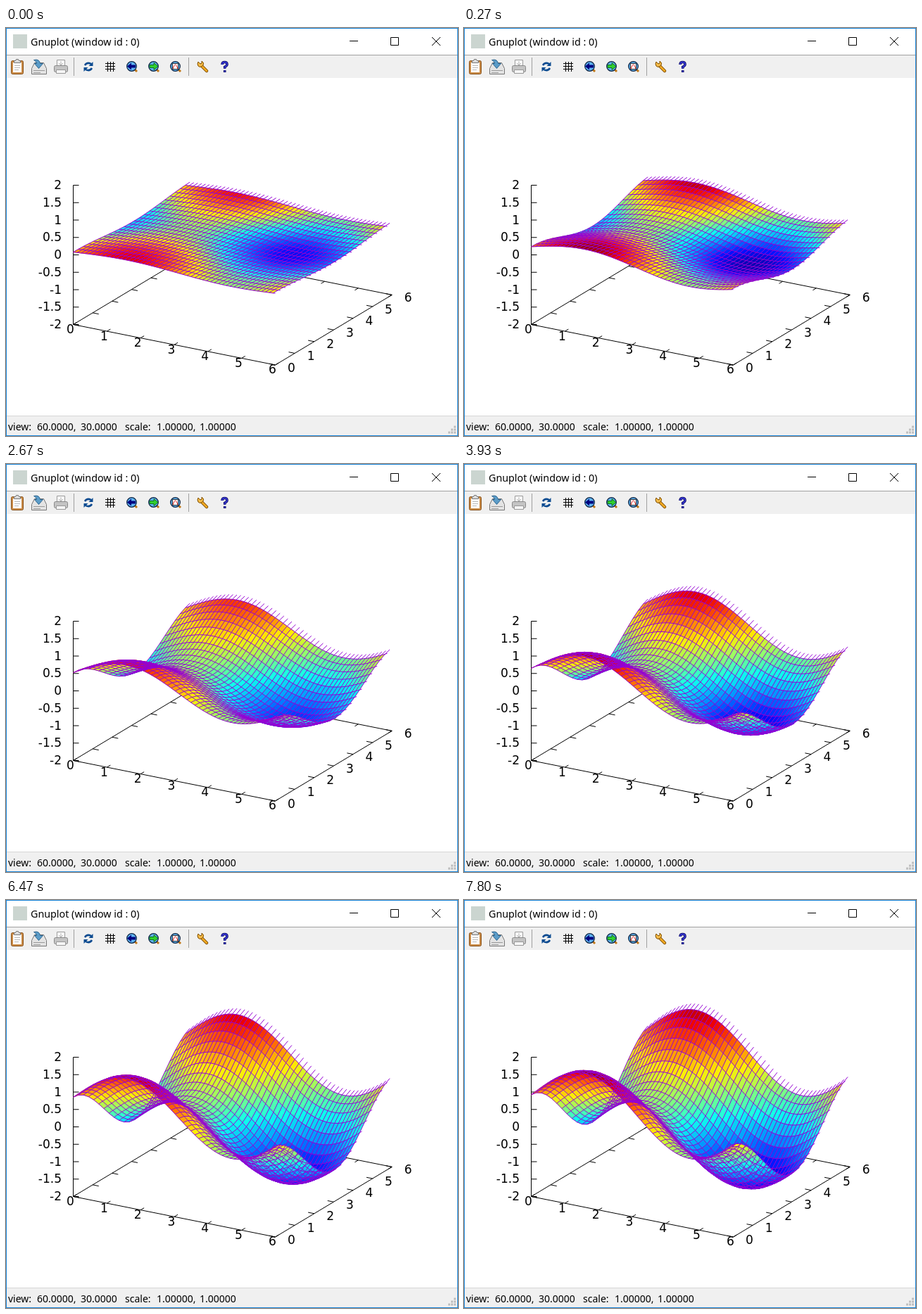
These frames come from a looping animation (642x580 px, 8 s). An HTML page with a canvas:

```html
<!DOCTYPE html>
<html lang="en">
<head>
<meta charset="utf-8">
<title>Surface plot</title>
<style>
html, body { margin: 0; width: 100%; height: 100%; overflow: hidden; background: #fff; }
svg, canvas { position: absolute; left: 0; top: 0; display: block; }
.ui { font-family: "Segoe UI", "Open Sans", sans-serif; }
.num { font: 17px Verdana, "DejaVu Sans", sans-serif; }
</style>
</head>
<body>
<svg width="642" height="580" viewBox="0 0 642 580">
  <rect width="642" height="580" fill="#fff"/>
  <rect y="39" width="642" height="32" fill="#f0f0f0"/>
  <path d="M0 38.5H642" stroke="#a0a0a0"/>
  <rect y="551" width="642" height="29" fill="#f0f0f0"/>
  <path d="M0 551.5H642" stroke="#d7d7d7"/>

  <rect x="10" y="9" width="20" height="20" fill="#cbd5d0"/>
  <text class="ui" x="35" y="25" font-size="14.3">Gnuplot (window id : 0)</text>
  <path d="M488 18.5H500M546.5 13.5h11v11h-11zM605 13l12 12M617 13l-12 12" fill="none" stroke="#000"/>
  <path d="M96.5 42V68M259.5 42V68" stroke="#a0a0a0"/>

  <!-- clipboard -->
  <rect x="7.5" y="46.5" width="17" height="19" rx="2" fill="#c98a45" stroke="#8a5520"/>
  <path d="M10 49h12v14h-12z" fill="#fff"/>
  <path d="M12 53.5h8M12 56.5h8M12 59.5h6" stroke="#b5b5b5"/>
  <path d="M11.5 49.5v-3h2l1-2h3l1 2h2v3z" fill="#ddd" stroke="#777"/>
  <!-- save -->
  <path d="M36.5 57.5l4-8h13l4 8v8h-21z" fill="#e4e4e4" stroke="#777"/>
  <path d="M39 60.5h16M39 63.5h10" stroke="#999"/>
  <path d="M39.5 45.5q8-2 9 5h4l-6 7-6-7h3q0-3-4-5z" fill="#5b9cc8" stroke="#2c6590"/>
  <!-- printer -->
  <path d="M72.5 54v-8.5h11V54" fill="#fff" stroke="#999"/>
  <rect x="68.5" y="53.5" width="19" height="9" rx="2" fill="#c4c4c4" stroke="#888"/>
  <path d="M71.5 59.5h13v5h-13z" fill="#f5f5f5" stroke="#999"/>
  <path d="M78 47v5m-3-2l3 3 3-3" fill="none" stroke="#aaa"/>
  <!-- refresh -->
  <path d="M112 53q3-5 9-2M122 57q-3 5-9 2" fill="none" stroke="#0b4a90" stroke-width="2.5"/>
  <path d="M123.5 48v6h-6zM110.5 62v-6h6z" fill="#0b4a90"/>
  <!-- grid -->
  <path d="M144.5 48v14M148.5 48v14M152.5 48v14M141 50.5h14M141 54.5h14M141 58.5h14" stroke="#000"/>
  <!-- zooms -->
  <g id="lens">
    <path d="M182 58l4 4" stroke="#c17818" stroke-width="3"/>
    <circle cx="178.5" cy="54.5" r="6.8" fill="#5fb4f2" stroke="#102848" stroke-width="1.3"/>
  </g>
  <use href="#lens" x="31"/>
  <use href="#lens" x="62"/>
  <path d="M172 54.5l6-5v3h6v4h-6v3z" fill="#000080"/>
  <path d="M216 54.5l-6-5v3h-6v4h6v3z" fill="#30d030" stroke="#086008" stroke-width=".8"/>
  <path d="M236.5 50.5h8v8h-8z" fill="#fff" stroke="#333"/>
  <path d="M237 58q3.500-12 7 0" fill="none" stroke="#e02020"/>
  <!-- wrench -->
  <path d="M277 53l8 8" stroke="#7c4b00" stroke-width="4.5" stroke-linecap="round"/>
  <path d="M277 53l8 8" stroke="#f2aa22" stroke-width="2.5" stroke-linecap="round"/>
  <path d="M273 48l3 3 2-1 0-3q4 2 2 6-4 4-7 1-2-3 0-6z" fill="#f5bc48" stroke="#7c4b00"/>
  <!-- help -->
  <path d="M307 52q0-3.500 3.500-3.500t3.500 3.200q0 2-3.300 3.600v2.500M310.700 60v3" fill="none" stroke="#101060" stroke-width="3.6"/>
  <path d="M307 52q0-3.500 3.500-3.500t3.500 3.200q0 2-3.300 3.600v2.500M310.700 60.500v2" fill="none" stroke="#3434d0" stroke-width="1.8"/>

  <g class="ui" font-size="14">
    <text x="3" y="572">view:</text>
    <text x="44" y="572">60.0000,</text>
    <text x="106" y="572">30.0000</text>
    <text x="169" y="572">scale:</text>
    <text x="214" y="572">1.00000,</text>
    <text x="275" y="572">1.00000</text>
  </g>
  <path d="M636 567h3M636 571h3M636 575h3M632 571h3M632 575h3M628 575h3" stroke="#bfbfbf" stroke-width="3"/>
  <path id="axes" fill="none" stroke="#000"/>
  <g id="labels" class="num"></g>
  <rect x=".5" y=".5" width="641" height="579" fill="none" stroke="#1883d7"/>
</svg>
<canvas id="plot" width="642" height="580"></canvas>
<script>
const SIZE = 6, ZPX = 49.5;
const STEP_X = Math.PI / 27, STEP_Y = Math.PI / 12;
const CHANGES = [270, 1470, 2670, 3930, 5200, 6470, 7800], LOOP = 8000;
const PALETTE = [[0, 0, 144], [0, 15, 255], [0, 144, 255], [15, 255, 238], [144, 255, 112],
  [255, 238, 0], [255, 112, 0], [238, 0, 0], [127, 0, 0]];

// View turned by 30 degrees and tilted by 60
const project = (x, y, z) => [
  95.5 + (287 * x + 165.7 * y) / SIZE,
  322.5 + (57.5 * x - 99.6 * y) / SIZE - ZPX * z
];
const shape = (x, y) => Math.sin(x) + Math.cos(y);

function drawAxes() {
  let d = "", text = "";
  const line = (a, b) => d += `M${a}L${b}`;
  const label = (s, x, y, anchor = "middle") =>
    text += `<text x="${x}" y="${y}" text-anchor="${anchor}">${s}</text>`;
  const base = (x, y) => project(x, y, -2);
  const tick = 0.18;

  d += `M${base(0, 0)}L${base(6, 0)}L${base(6, 6)}L${base(0, 6)}Z`;
  line(base(0, 0), project(0, 0, 2));
  for (let i = 0; i <= SIZE; i++) {
    line(base(i, 0), base(i, tick));
    line(base(i, 6), base(i, 6 - tick));
    line(base(0, i), base(tick, i));
    line(base(6, i), base(6 - tick, i));
    label(i, 91.5 + 47.8 * i, 434 + 9.5 * i);
    label(i, 405.5 + 27.6 * i, 488.5 - 16.6 * i);
  }
  for (let z = -2; z <= 2; z += 0.5) {
    const [x, y] = project(0, 0, z);
    line([x, y], [x + 8, y]);
    label(z, 79, y + 5.5, "end");
  }
  axes.setAttribute("d", d);
  labels.innerHTML = text;
}

function gridPoints(step) {
  const list = [];
  for (let v = 0; v < SIZE; v += step) list.push(v);
  return list;
}
const xs = gridPoints(STEP_X), ys = gridPoints(STEP_Y);
const ctx = plot.getContext("2d");

// Colour range widened to the next round tick
function colorLimit(peak) {
  const power = 10 ** Math.floor(Math.log10(2 * peak)), norm = 2 * peak / power;
  const tick = power * (norm < 2 ? 0.2 : norm < 5 ? 0.5 : 1);
  return Math.ceil(peak / tick) * tick;
}

function color(level) {
  const p = Math.max(0, Math.min(7.999, level * 8)), i = Math.floor(p);
  const mix = PALETTE[i].map((c, j) => Math.round(c + (PALETTE[i + 1][j] - c) * (p - i)));
  return `rgb(${mix})`;
}

function trace(points) {
  points.forEach((p, i) => i ? ctx.lineTo(...p) : ctx.moveTo(...p));
}

function drawSurface(height) {
  const at = (x, y) => project(x, y, height * shape(x, y));
  const limit = colorLimit(2 * height);
  ctx.clearRect(0, 0, 642, 580);
  ctx.lineJoin = "round";

  // Filled cells from back to front, coloured by mean height
  ctx.lineWidth = 0.6;
  for (let j = ys.length - 2; j >= 0; j--) {
    for (let i = 0; i < xs.length - 1; i++) {
      const corners = [[xs[i], ys[j]], [xs[i + 1], ys[j]], [xs[i + 1], ys[j + 1]], [xs[i], ys[j + 1]]];
      const mean = height * corners.reduce((sum, c) => sum + shape(...c), 0) / 4;
      ctx.fillStyle = ctx.strokeStyle = color(0.5 + mean / limit / 2);
      ctx.beginPath();
      trace(corners.map(c => at(...c)));
      ctx.closePath();
      ctx.fill();
      ctx.stroke();
    }
  }

  // Mesh lines run on to the edge of the axis range
  ctx.lineWidth = 1;
  ctx.strokeStyle = "#9400d3";
  for (const y of ys) {
    ctx.beginPath();
    trace([...xs, SIZE].map(x => at(x, y)));
    ctx.stroke();
  }
  for (const x of xs) {
    ctx.beginPath();
    trace([...ys, SIZE].map(y => at(x, y)));
    ctx.stroke();
  }
}

let shown = -1;
const start = performance.now();
function frame() {
  const t = (performance.now() - start) % LOOP;
  const step = CHANGES.filter(c => t >= c).length;
  if (step !== shown) {
    shown = step;
    drawSurface(Math.sin((step + 0.5) * Math.PI / 20));
  }
  requestAnimationFrame(frame);
}
drawAxes();
frame();
</script>
</body>
</html>
```
